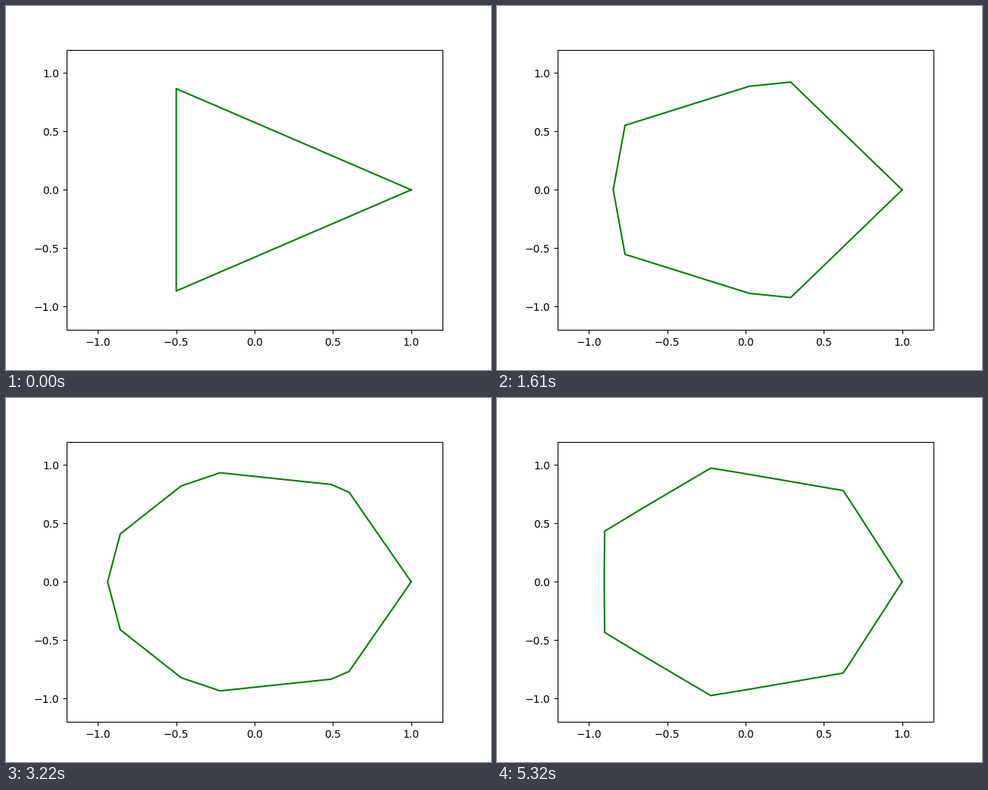
A matplotlib script for the animation above (8960 ms loop, 640 by 480 pixels).

```python
import numpy as np
import matplotlib.pyplot as plt
from matplotlib.animation import FuncAnimation

FRAMES = 128
INTERVAL = 70
FIRST, LAST = 3, 8      # side counts at both ends of the morph
HOLD_FROM = 76          # the shape rests from this frame on


def outline(sides, s):
    """Points of a regular polygon at perimeter fractions s."""
    k = np.arange(sides + 1)
    angle = 2 * np.pi * k / sides
    return (np.interp(s, k / sides, np.cos(angle)),
            np.interp(s, k / sides, np.sin(angle)))


def morph(u):
    """Blend of the polygons with floor(u) and floor(u) + 1 sides."""
    n = min(int(u), LAST - 1)
    t = u - n
    s = np.union1d(np.arange(n + 1) / n, np.arange(n + 2) / (n + 1))
    x0, y0 = outline(n, s)
    x1, y1 = outline(n + 1, s)
    return (1 - t) * x0 + t * x1, (1 - t) * y0 + t * y1


def sides_at(i):
    """Steady rise to LAST sides and back again."""
    span = LAST - FIRST
    p = 2 * span * min(i, HOLD_FROM) / (FRAMES - 1)
    return FIRST + span - abs(span - p)


fig, ax = plt.subplots(figsize=(6.4, 4.8), dpi=100)
ax.set_xlim(-1.2, 1.2)
ax.set_ylim(-1.2, 1.2)
line, = ax.plot([], [], "g-", lw=1.5)


def update(i):
    line.set_data(*morph(sides_at(i)))
    return line,


def init():
    return update(0)


anim = FuncAnimation(fig, update, frames=FRAMES, init_func=init,
                     interval=INTERVAL, repeat=True, repeat_delay=0)
plt.show()
```
